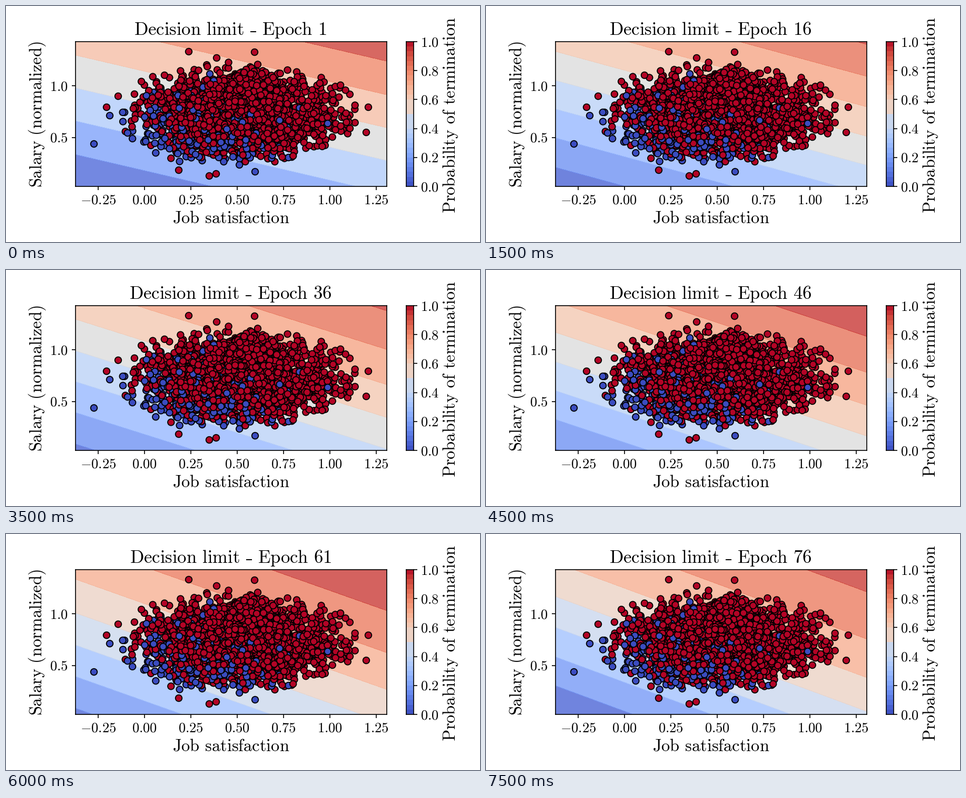
These frames come from a looping animation (900 by 450 pixels, 8 s). A matplotlib script:

```python
import numpy as np
import matplotlib.pyplot as plt
from matplotlib.animation import FuncAnimation

plt.rcParams["mathtext.fontset"] = "cm"

W, H, DPI = 900, 450, 150
LEFT, RIGHT, TOP, BOTTOM = 132, 723, 68, 344
SPACE = r"\hspace{0.38}"
HYPHEN = r"\overline{\hspace{0.3}}\hspace{0.08}"
TITLE_PX, LABEL_PX, TICK_PX = 34.6, 32.4, 26.5
FRAMES, STEP = 16, 5


def to_data(px, py):
    """Stage pixels to satisfaction / salary units."""
    return (np.asarray(px) - 263) / 352, (350 - np.asarray(py)) / 198


def roman(s):
    s = s.replace(" - ", SPACE + HYPHEN + SPACE).replace(" ", SPACE)
    return r"$\mathrm{" + s + "}$"


def put(x, y, s, px, ha="center", rotation=0):
    return fig.text(x / W, 1 - y / H, roman(s), fontsize=px * 72 / DPI, ha=ha,
                    va="baseline", rotation=rotation, rotation_mode="anchor")


def add_axes(left, right):
    return fig.add_axes([left / W, 1 - BOTTOM / H,
                         (right - left) / W, (BOTTOM - TOP) / H])


fig = plt.figure(figsize=(W / DPI, H / DPI), dpi=DPI, facecolor="white")

# Main axes
ax = add_axes(LEFT, RIGHT)
xlim, ylim = to_data([LEFT, RIGHT], [BOTTOM, TOP])
ax.set(xlim=xlim, ylim=ylim)
xticks, yticks = np.arange(-0.25, 1.3, 0.25), (0.5, 1.0)
ax.set_xticks(xticks)
ax.set_yticks(yticks)
ax.tick_params(labelbottom=False, labelleft=False)
for v in xticks:
    put(263 + 352 * v, 377.5, f"{v:.2f}", TICK_PX)
for v in yticks:
    put(117.5, 359 - 198 * v, f"{v:.1f}", TICK_PX, ha="right")
put(427.5, 413, "Job satisfaction", LABEL_PX)
put(68, 206.5, "Salary (normalized)", LABEL_PX, rotation=90)
title = put(426.5, 54.5, "Decision limit - Epoch 1", TITLE_PX)

# Colour bar in flat bands, one wide band on each side of the middle
cax = add_axes(760, 774)
bands = (np.arange(30) + 0.5) / 30
off = bands - 0.5
bands = np.where(abs(off) < 0.09, 0.5 + 0.07 * np.sign(off), bands)
cax.imshow(bands[:, None], cmap="coolwarm", vmin=0, vmax=1, origin="lower",
           extent=(0, 1, 0, 1), aspect="auto", interpolation="nearest")
cax.set_xticks([])
cax.set_yticks(np.linspace(0, 1, 6))
cax.yaxis.tick_right()
cax.tick_params(labelright=False)
for v in np.linspace(0, 1, 6):
    put(787, BOTTOM - 276 * v + 9, f"{v:.1f}", TICK_PX, ha="left")
put(853, 207.5, "Probability of termination", LABEL_PX, rotation=90)

# Employees: a normal cloud, more often blue towards low pay and satisfaction,
# plus the few that stand furthest out
rng = np.random.default_rng(7)
u, v = rng.normal(size=(2, 3200))
near = np.hypot(u, v) < 3
u, v = u[near], v[near]
stays = rng.random(u.size) < 1 / (1 + np.exp(2.6 + 0.9 * u - 0.9 * v))
far_blue = [(167, 263), (197, 209), (473, 316)]
far_red = [(347, 87), (472, 88), (400, 99), (191, 193), (213, 172),
           (688, 193), (684, 241), (328, 313), (386, 324), (399, 320)]
cloud = np.column_stack([442 + 78 * u, 207 + 35 * v])
px, py = np.vstack([far_blue, far_red, cloud]).T
quits = np.r_[np.zeros(len(far_blue)), np.ones(len(far_red)), ~stays]
dots = ax.scatter(*to_data(px, py), s=36, c=quits, cmap="coolwarm",
                  vmin=0, vmax=1, edgecolors="black", linewidths=0.9, zorder=2)

gx, gy = np.meshgrid(np.linspace(LEFT, RIGHT, 150), np.linspace(BOTTOM, TOP, 80))
grid = to_data(gx, gy)


def predict(epoch):
    """Logistic model whose limit tilts, sinks and sharpens with training."""
    t = (epoch - 1) / 75
    tilt = 0.234 + 0.2146 * t - 0.078 * t**2
    height = 125 + 249 * t - 154 * t**2 + 51 * t**3
    gain = (2.564 + 1.803 * t) / 1000
    return 1 / (1 + np.exp(gain * (gy - tilt * (gx - LEFT) - height)))


def update(i):
    epoch = 1 + STEP * i
    for c in list(ax.collections):
        if c is not dots:
            c.remove()
    ax.contourf(*grid, predict(epoch), cmap="coolwarm", alpha=0.8, zorder=1)
    title.set_text(roman(f"Decision limit - Epoch {epoch}"))
    return []


anim = FuncAnimation(fig, update, frames=FRAMES, interval=500, repeat=True,
                     repeat_delay=0, init_func=lambda: [], blit=False)
plt.show()
```
